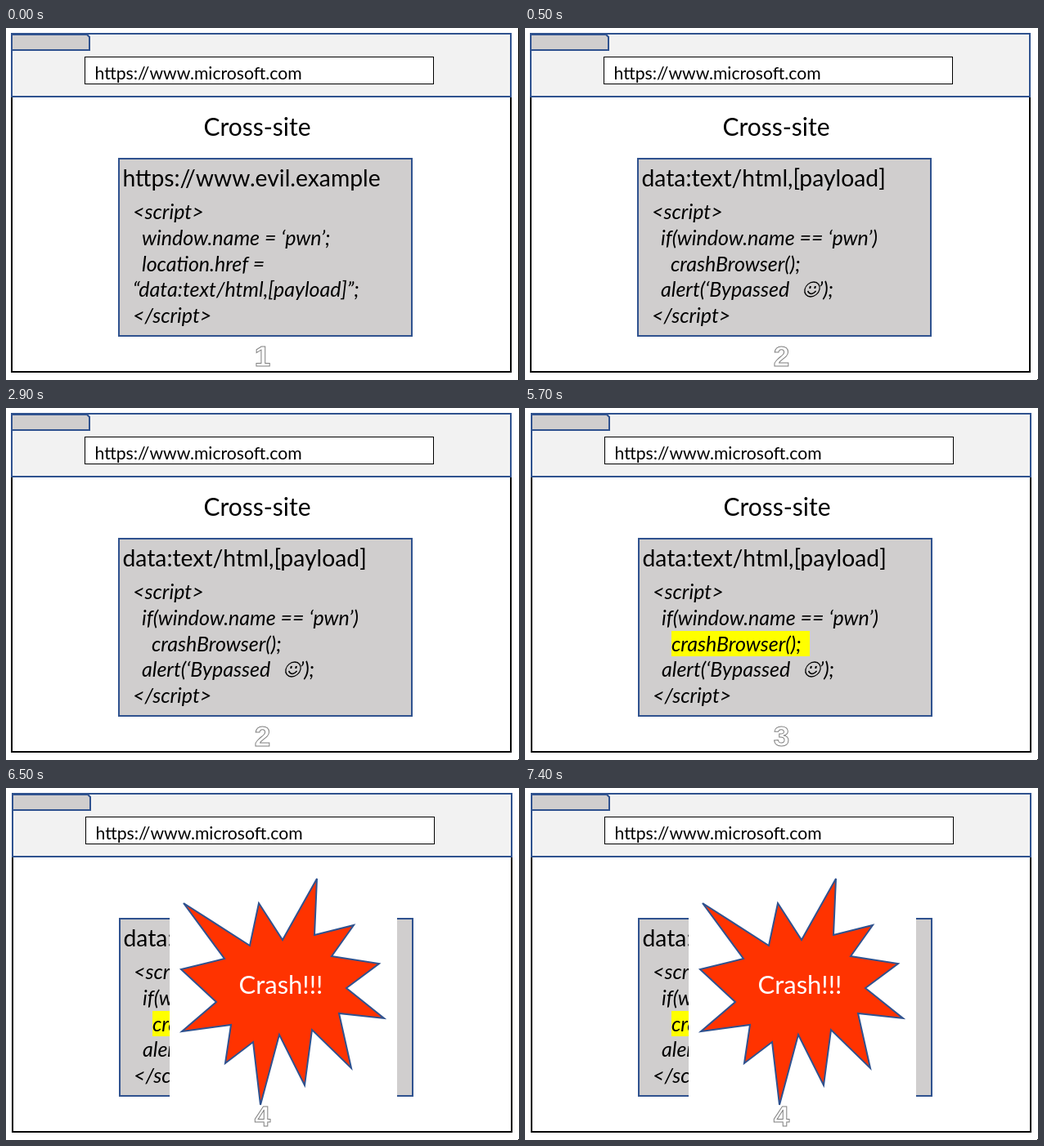
An HTML page that plays this animation: 627 px wide and 431 px high, repeating every 8 s.

```html
<!DOCTYPE html>
<html lang="en">
<head>
<meta charset="utf-8">
<title>Cross-site crash</title>
<style>
  html, body { margin: 0; width: 100%; height: 100%; overflow: hidden; background: #fff; }
  svg { display: block; width: 627px; height: 431px; font-family: Lato, sans-serif; }
  .edge { stroke: #2f528f; stroke-width: 2; }
  .grey { fill: #d0cece; }
  .heading { font-size: 28.3px; }
  .code { font-size: 25px; font-style: italic; }
  .mid { text-anchor: middle; }
  #step { font: bold 35px "Liberation Sans", Arial, sans-serif; fill: #fff; stroke: #7f7f7f; }
</style>
</head>
<body>
<svg viewBox="0 0 627 431">
  <g id="page">
    <rect x="7" y="7" width="610" height="414" fill="#fff" stroke="#000" stroke-width="2"/>
    <rect class="edge" x="7" y="7" width="610" height="77" fill="#f2f2f2"/>
    <path class="edge grey" d="M7 8H99L102 11V27H7Z"/>
    <rect x="96.5" y="35.5" width="426" height="33" fill="#fff" stroke="#000"/>
    <text x="108.5" y="63" font-size="21.2">https://www.microsoft.com</text>
    <text class="mid" x="307" y="132" font-size="30">Cross-site</text>
    <rect class="edge grey" x="138" y="160" width="358" height="217"/>

    <g class="step0">
      <text class="heading" x="142.5" y="194">https://www.evil.example</text>
      <g class="code">
        <text x="166" y="266">window.name = ‘pwn’;</text>
        <text x="166" y="298">location.href =</text>
        <text x="155" y="329">“data&#58;text/html,[payload]”;</text>
      </g>
    </g>

    <g class="step1 step2 step3">
      <text class="heading" x="142.5" y="194">data&#58;text/html,[payload]</text>
      <rect class="step2 step3" x="178" y="273" width="169" height="31" fill="#ff0"/>
      <g class="code">
        <text x="166" y="266">if(window.name == ‘pwn’)</text>
        <text x="178" y="298">crashBrowser();</text>
        <text x="166" y="329">alert(‘Bypassed</text>
        <text x="359" y="329">’);</text>
      </g>
      <g transform="translate(351 320) skewX(-12)" fill="none" stroke="#000" stroke-width="1.3">
        <circle r="9"/>
        <path d="M-5 2Q0 9 5 2"/>
        <path d="M-3 -4v3M3 -4v3" stroke-width="2"/>
      </g>
    </g>

    <g class="code">
      <text x="155" y="234">&lt;script&gt;</text>
      <text x="155" y="361">&lt;/script&gt;</text>
    </g>
  </g>

  <g class="step3">
    <rect x="200" y="108" width="278" height="282" fill="#fff"/>
    <polygon class="edge" fill="#f30" points="
      380,111 377,180 425,168 398,206 456,215 416,245
      462,282 407,276 422,343 374,296 365,364 334,302
      311,388 302,311 268,337 275,290 215,298 257,262
      214,222 267,209 217,141 298,193 309,141 338,186"/>
    <text class="mid" x="336" y="252" font-size="31" fill="#fff">Crash!!!</text>
  </g>

  <text id="step" class="mid" x="313.5" y="414"></text>
  <rect class="step0" x="626" width="1" height="431"/>
  <rect x="626" y="430" width="1" height="1"/>
</svg>
<script>
  const LOOP = 8000, STARTS = [0, 500, 4500, 6500];
  const page = document.getElementById('page');
  const label = document.getElementById('step');
  const parts = document.querySelectorAll('[class*="step"]');

  function draw() {
    const time = performance.now() % LOOP;
    const step = STARTS.filter(start => start <= time).length - 1;
    for (const part of parts)
      part.style.display = part.classList.contains('step' + step) ? '' : 'none';
    page.setAttribute('transform', `translate(${step > 1 ? 1 : 0} 0)`);
    label.textContent = step + 1;
    requestAnimationFrame(draw);
  }
  draw();
</script>
</body>
</html>
```
